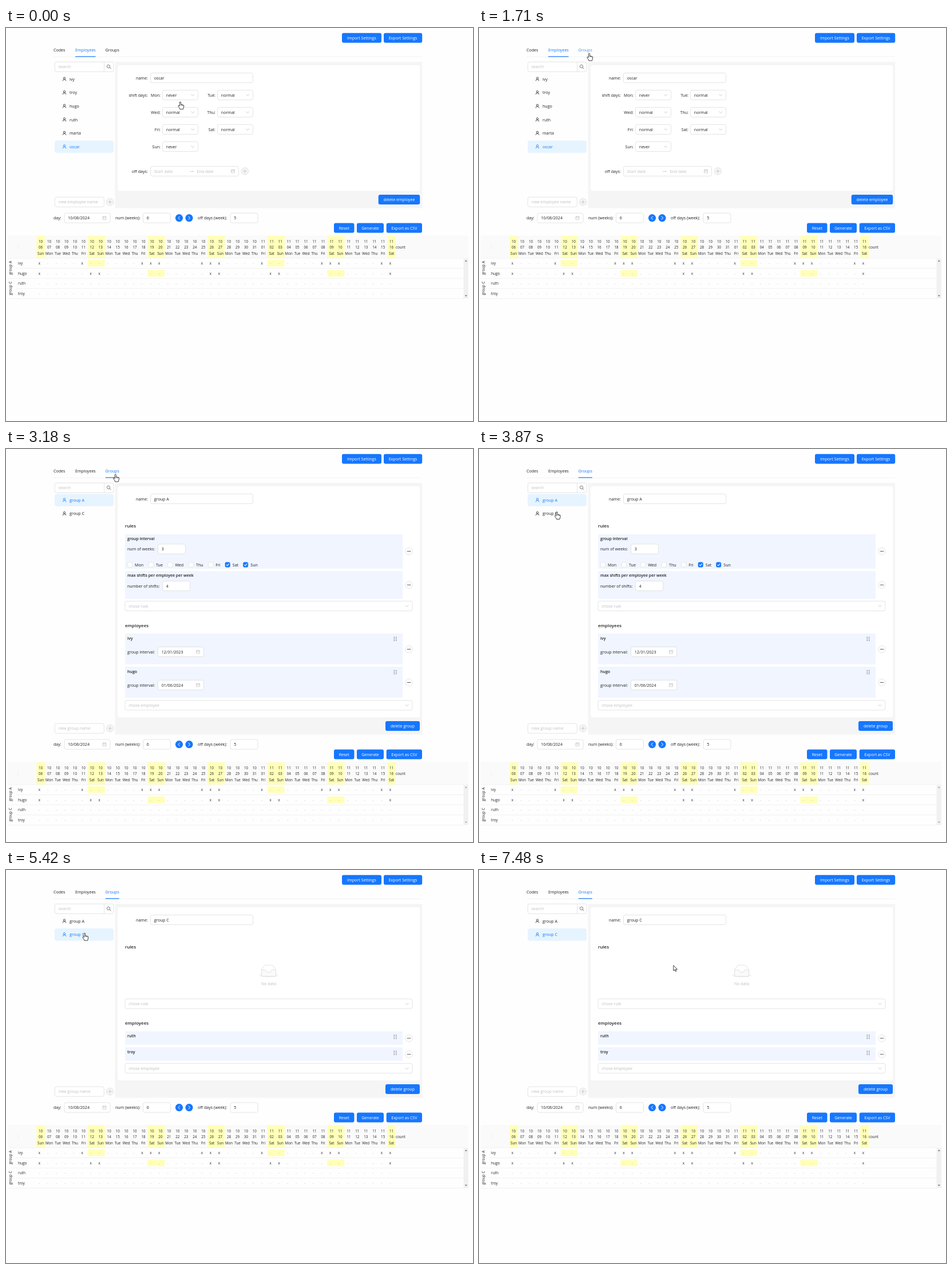
An HTML page that plays this animation: 816 by 686 pixels, repeating every 8 s.

```html
<!DOCTYPE html>
<html lang="en">
<head>
<meta charset="utf-8">
<title>Shift planner</title>
<style>
  html, body { margin: 0; width: 100%; height: 100%; overflow: hidden; background: #fefefe; }
  svg { display: block; width: 100vw; height: 100vh; }
  text { font-family: "Open Sans", "Noto Sans", sans-serif; font-size: 7.1px; white-space: pre; }
</style>
</head>
<body>
<svg id="stage" viewBox="0 0 816 686"></svg>
<script>
const LOOP = 8000;
const BLUE = '#1677ff', HOVER = '#4096ff', INK = '#222', PALE = '#bfbfbf', LINE = '#d9d9d9', YELLOW = '#ffffb8';
const days = ['Sun', 'Mon', 'Tue', 'Wed', 'Thu', 'Fri', 'Sat'];
const people = ['ivy', 'troy', 'hugo', 'ruth', 'marta', 'oscar'];
const [ivy, troy, hugo, ruth, , oscar] = people;

// Drawing helpers; y is the vertical centre of a line of text
const text = (x, y, s, fill = INK, more = '') =>
  `<text x="${x}" y="${y + 2.5}" fill="${fill}" ${more}>${s}</text>`;
const mid = (x, y, s, fill, more = '') => text(x, y, s, fill, 'text-anchor="middle" ' + more);
const end = (x, y, s) => text(x, y, s, INK, 'text-anchor="end"');
const bold = (x, y, s, size = 7) => text(x, y, s, INK, `style="font-weight:600;font-size:${size}px"`);
const rect = (x, y, w, h, fill, more = '') =>
  `<rect x="${x}" y="${y}" width="${w}" height="${h}" fill="${fill}" ${more}/>`;
const line = (d, stroke, w = .7, more = '') =>
  `<path d="${d}" fill="none" stroke="${stroke}" stroke-width="${w}" ${more}/>`;
const group = (id, body, more = '') => `<g id="${id}" ${more}>${body}</g>`;

const box = (x, y, w, s = '', fill = INK, more = '') =>
  rect(x, y - 8.5, w, 17, '#fff', `rx="3" stroke="${LINE}" stroke-width=".7" ${more}`) + text(x + 6.3, y, s, fill);
const button = (x, y, w, s) => rect(x, y - 8.5, w, 17, BLUE, 'rx="3"') + mid(x + w / 2, y, s, '#fff');
const chevron = (x, y) => line(`M${x - 2.8} ${y - 1.4}l2.8 2.9 2.8-2.9`, PALE, .8);
const select = (x, y, w, s, fill) => box(x, y, w, s, fill) + chevron(x + w - 9.3, y);
const calendar = (x, y) => line(`M${x - 3} ${y - 2.4}h6v5.2h-6zM${x - 3} ${y - .4}h6M${x - 1.5} ${y - 3.4}v1.8M${x + 1.5} ${y - 3.4}v1.8`, PALE);
const dateBox = (x, y, s) => box(x, y, 80, s) + calendar(x + 70, y);
const ring = (x, y, plus) =>
  `<circle cx="${x}" cy="${y}" r="6.2" fill="${plus ? '#f5f5f5' : '#fff'}" stroke="${LINE}" stroke-width=".7"/>` +
  line(`M${x - 3.3} ${y}h6.6` + (plus ? `M${x} ${y - 3.3}v6.6` : ''), plus ? PALE : '#333', .8);
const grip = (x, y) => [-1.7, 1.7].map(dx => [-2.9, 0, 2.9].map(dy =>
  rect(x + dx - .6, y + dy - .6, 1.2, 1.2, '#444')).join('')).join('');
const card = (y, h) => rect(208, y, 485, h, '#f0f5ff');

const row = (id, i, s, on) => {
  const y = 89.2 + i * 23.6;
  return rect(85, y - 10.8, 103, 21.6, '#e6f4ff', `rx="4" id="${id}Bg" opacity="${on ? 1 : 0}"`) +
    group(id, `<circle cx="102" cy="${y - 1.6}" r="1.7" fill="none" stroke="currentColor" stroke-width=".8"/>` +
      line(`M99.2 ${y + 3.2}q.2-2.9 2.8-2.9t2.8 2.9`, 'currentColor', .8) +
      text(111, y, s, 'currentColor'), `color="${on ? BLUE : INK}"`);
};

const nameField = (s, id) => end(247.8, 87, 'name:') + box(252.5, 87, 179, s, INK, id ? `id="${id}"` : '');

function employeePanel() {
  let out = nameField(oscar, 'nameBox') + end(247.8, 117, 'shift days:');
  [1, 2, 3, 4, 5, 6, 0].forEach((d, i) => {
    const x = i % 2 ? 369.5 : 273.5, y = 117 + (i >> 1) * 30;
    out += end(x - 3.5, y, days[d] + ':') + select(x, y, 62, d < 2 ? 'never' : 'normal');
  });
  return out + end(247.8, 250, 'off days:') + box(252.5, 250, 154, 'Start date', PALE) +
    line('M321 250.5h6.5l-2-1.8', PALE) + text(333.5, 250, 'End date', PALE) +
    calendar(396.5, 250) + ring(417.5, 250, true);
}

function checkboxes(y) {
  const xs = [212.3, 249.2, 282.6, 319.2, 353.5, 383, 414.5];
  return xs.map((x, i) => {
    const on = i > 4;
    return rect(x, y - 4.2, 8.4, 8.4, on ? BLUE : '#fff', `rx="2" stroke="${on ? BLUE : LINE}" stroke-width=".6"`) +
      (on ? line(`M${x + 2} ${y}l1.8 1.8 2.9-3.6`, '#fff', 1.1) : '') +
      text(x + 12.8, y, days[(i + 1) % 7]);
  }).join('');
}

const memberCard = (y, s, date) => card(y, 54) + bold(212, y + 8, s) + text(212, y + 32, 'group interval:') +
  dateBox(265.5, y + 32, date) + grip(680, y + 9.5) + ring(704, y + 27.5);

const panelA = () => nameField('group A') + bold(208, 134, 'rules', 7.9) +
  card(149, 60) + bold(212, 156, 'group interval') + text(212, 174.5, 'num of weeks:') +
  box(265.5, 174.5, 48, '3') + checkboxes(202) + ring(704, 178.5) +
  card(213, 48.5) + bold(212, 220.3, 'max shifts per employee per week') +
  text(212, 239, 'number of shifts:') + box(273.5, 239, 48, '4') + ring(704, 237.3) +
  select(208, 274, 502, 'chose rule', PALE) + bold(208, 308, 'employees', 7.9) +
  memberCard(322, ivy, '12/31/2023') + memberCard(380, hugo, '01/06/2024') +
  select(208, 447.3, 502, 'chose employee', PALE);

const smallCard = (y, s) => card(y, 23.5) + bold(212, y + 8, s) + grip(680, y + 9.7) + ring(704, y + 12.2);

const panelC = () => nameField('group C') + bold(208, 134, 'rules', 7.9) +
  '<ellipse cx="459" cy="184" rx="17" ry="3.6" fill="#f5f5f5"/>' +
  '<path d="M446.5 174.5l5-7.5q.6-.9 1.6-.9h11.8q1 0 1.6.9l5 7.5v9.3q0 1.7-1.7 1.7h-21.6q-1.7 0-1.7-1.7z" fill="#fff" stroke="#d9d9d9" stroke-width=".7"/>' +
  '<path d="M446.5 174.5h6.7q1.2 0 1.2 1.2 0 2.4 2 2.4h5.2q2 0 2-2.4 0-1.2 1.2-1.2h6.7v9.3q0 1.7-1.7 1.7h-21.6q-1.7 0-1.7-1.7z" fill="#fafafa" stroke="#d9d9d9" stroke-width=".7"/>' +
  mid(459, 198, 'No data', PALE) + select(208, 233.5, 502, 'chose rule', PALE) +
  bold(208, 267.3, 'employees', 7.9) + smallCard(281.5, ruth) + smallCard(309.5, troy) +
  select(208, 346.2, 502, 'chose employee', PALE);

function table() {
  const step = 14.951, rowH = 17.65, small = 'style="font-size:6.2px"';
  const rows = [
    { name: ivy, x: [0, 5, 12, 13, 14, 19, 20, 21, 26, 33, 34, 35, 40, 41], free: [6, 27] },
    { name: hugo, x: [0, 6, 7, 20, 21, 27, 28, 41], free: [13, 34] },
    { name: ruth, x: [], free: [] },
    { name: troy, x: [], free: [] }
  ];
  let out = rect(3, 362.3, 805, 39.7, '#fafafa') + line('M21.5 377v10', '#f0f0f0');
  for (let i = 0; i < 42; i++) {
    const x = 60.6 + i * step, d = i % 7, oct = i < 26;
    if (d === 0 || d === 6) out += rect(x - step / 2, 362.8, step + .05, 39, YELLOW);
    const day = String(oct ? i + 6 : i - 25).padStart(2, '0');
    [oct ? 10 : 11, day, days[d]].forEach((s, k) => {
      out += mid(x, 372 + k * 10.9, s, INK, 'style="font-size:6.2px;font-weight:500"');
    });
  }
  out += text(681, 382, 'count', INK, 'style="font-size:6.3px;font-weight:500"') + line('M3 402h797', '#f0f0f0');
  rows.forEach((r, k) => {
    const y = 410.6 + k * rowH;
    r.free.forEach(c => out += rect(53.1 + c * step - .1, y - 5.8, step * 2, 11.6, YELLOW));
    out += text(21, y, r.name, INK, 'style="font-size:6.5px"');
    for (let i = 0; i < 42; i++) {
      const on = r.x.includes(i);
      out += mid(58.4 + i * step, y, on ? 'x' : '-', on ? INK : '#b5b5b5', small);
    }
    out += line(`M${k % 2 ? 3 : 18} ${y + 8.8}H800`, '#ececec');
  });
  ['A', 'C'].forEach((s, k) => {
    out += `<text transform="translate(10.4 ${418.7 + k * 35.6}) rotate(-90)" text-anchor="middle" fill="${INK}" style="font-size:6.6px;font-weight:500">group ${s}</text>`;
  });
  return out + rect(799.5, 402, 8.5, 70.3, '#f1f1f1') +
    '<path id="arrows" d="M801.8 407.6h4l-2-2.4zM801.8 466.4h4l-2 2.4z"/>';
}

const lower = () => box(85.3, 303.7, 86) + ring(181.6, 303.7, true) +
  group('empFoot', text(91.8, 303.7, 'new employee name', PALE) + button(650.7, 299.5, 72.5, 'delete employee')) +
  group('grpFoot', text(91.8, 303.7, 'new group name', PALE) + button(663, 299.5, 60, 'delete group')) +
  text(83, 331.6, 'day:') + dateBox(102, 331.6, '10/08/2024') +
  text(191, 331.6, 'num (weeks):') + box(239.5, 331.6, 48, '6') +
  [302.5, 320].map((x, i) => `<circle cx="${x}" cy="331.6" r="6.6" fill="${BLUE}"/>` +
    line(i ? `M${x - 1.3} 328.6l2.8 3-2.8 3` : `M${x + 1.3} 328.6l-2.8 3 2.8 3`, '#fff', 1)).join('') +
  text(335, 331.6, 'off days (week):') + box(392, 331.6, 48, '5') +
  button(573, 349, 35.5, 'Reset') + button(613, 349, 47, 'Generate') + button(664.7, 349, 62.3, 'Export as CSV') +
  table();

const stage = document.getElementById('stage');
stage.innerHTML = button(587, 17.2, 69, 'Import Settings') + button(660, 17.2, 67.2, 'Export Settings') +
  line('M83 50.3H727', '#f0f0f0') + text(83, 38.5, 'Codes') +
  text(121, 38.5, 'Employees', BLUE, 'id="tabE"') + text(173.5, 38.5, 'Groups', INK, 'id="tabG"') +
  rect(121, 49.3, 35.5, 1.2, BLUE, 'id="bar"') +
  rect(190.6, 59.2, 536.6, 255.3, '#f5f5f5', 'id="outer"') + rect(195, 65, 528.2, 219.3, '#fff', 'rx="4" id="inner"') +
  box(85.3, 67.7, 102.7, 'search', PALE) + line('M171.5 59.5v16.6', LINE) +
  '<circle cx="179" cy="67" r="2.7" fill="none" stroke="#666" stroke-width=".8"/>' + line('M181 69l2.4 2.4', '#666', .9) +
  group('emp', people.map((s, i) => row('p' + i, i, s, i === 5)).join('') + employeePanel()) +
  group('grp', row('rowA', 0, 'group A', true) + row('rowC', 1, 'group C', false)) +
  group('panA', panelA()) + group('panC', panelC()) + group('low', lower()) +
  group('cursor',
    group('hand', '<path d="M-1.1 7.2V1a1.1 1.1 0 0 1 2.2 0V4.4l3.9.9q1.4.4 1.3 1.8L5.8 9.8 5 12.8H-.6L-1.2 10.8-3.6 7.6Q-3.8 6-2.3 6.2Z"/>' +
      line('M1.1 4.6v2M2.9 5v1.8M4.6 5.4v1.6', '#111', .6)) +
    '<path id="arrow" d="M0 0V9.4L2.2 7.4 3.6 10.6 5 10 3.6 6.9H6.6Z"/>',
    'fill="#fff" stroke="#111" stroke-width=".8" stroke-linejoin="round"');

const $ = {};
stage.querySelectorAll('[id]').forEach(e => $[e.id] = e);

const clamp = v => Math.min(1, Math.max(0, v));
const ease = v => v < .5 ? 4 * v ** 3 : 1 - (2 - 2 * v) ** 3 / 2;
const ramp = (t, a, b) => ease(clamp((t - a) / (b - a)));
const lerp = (a, b, p) => a + (b - a) * p;
const show = (id, on) => $[id].setAttribute('display', on ? 'inline' : 'none');
const set = (id, key, v) => $[id].setAttribute(key, v);
const rgb = c => (c.length < 5 ? [1, 2, 3].map(i => c[i] + c[i]) : [1, 3, 5].map(i => c.slice(i, i + 2))).map(h => parseInt(h, 16));
const mix = (a, b, p) => {
  const u = rgb(a), v = rgb(b);
  return `rgb(${u.map((c, i) => Math.round(lerp(c, v[i], p)))})`;
};

// Pointer moves: start, end, steps, way points
const moves = [
  [70, 430, 6, [[304.5, 129], [290, 108], [262, 86], [225, 65], [195, 57.3]]],
  [570, 570, 1, [[195, 57.3], [191.8, 56.6]]],
  [950, 950, 1, [[191.8, 56.6], [191.8, 50.4]]],
  [1300, 1440, 3, [[191.8, 50.4], [192.5, 44.3]]],
  [3180, 3180, 1, [[192.5, 44.3], [191.3, 44.3]]],
  [3310, 3940, 10, [[191.3, 44.3], [164, 70], [120, 90], [122, 105], [137.5, 110.3]]],
  [7220, 7480, 5, [[137.5, 110.3], [339.8, 166.5]]]
];

function pointer(t) {
  let at = moves[0][3][0];
  for (const [a, b, n, pts] of moves) {
    if (t < a) break;
    const k = t >= b ? n : Math.floor((t - a) / (b - a) * (n - 1)) + 1;
    const s = (1 - Math.cos(Math.PI * k / n)) / 2 * (pts.length - 1);
    const i = Math.min(pts.length - 2, Math.floor(s));
    at = [0, 1].map(j => lerp(pts[i][j], pts[i + 1][j], s - i));
  }
  return at;
}

const inside = ([x, y], l, t, r, b) => x >= l && x <= r && y >= t && y <= b;
const OPEN_A = 1780, OPEN_C = 5150;

function draw(t) {
  const scene = t < OPEN_A ? 0 : t < OPEN_C ? 1 : 2;
  const dy = [0, 184, 83][scene];
  show('emp', scene === 0);
  show('empFoot', scene === 0);
  show('grp', scene > 0);
  show('grpFoot', scene > 0);
  show('panA', scene === 1);
  show('panC', scene === 2);
  set('low', 'transform', `translate(0 ${dy})`);
  set('outer', 'height', 255.3 + dy);
  set('inner', 'height', 219.3 + dy);
  set('arrows', 'fill', scene === 1 ? '#a0a0a0' : '#666');

  const slide = ramp(t, OPEN_A, 2050), hover = ramp(t, 1370, 1640);
  set('bar', 'x', lerp(121, 173.8, slide));
  set('bar', 'width', lerp(35.5, 24, slide));
  set('tabE', 'fill', mix(BLUE, INK, slide));
  set('tabG', 'fill', slide > 0 ? mix(HOVER, BLUE, slide) : mix(INK, HOVER, hover));

  const pick = ramp(t, OPEN_C, 5420);
  set('rowABg', 'opacity', 1 - pick);
  set('rowCBg', 'opacity', ramp(t, 4870, 5080));
  set('rowA', 'color', mix(BLUE, INK, pick));
  set('rowC', 'color', mix(INK, BLUE, pick));

  const p = pointer(t);
  const hand = inside(p, 173, 30, 199, 49) || inside(p, 85, 78, 188, 124) || (scene === 0 && inside(p, 273, 108, 335, 131));
  set('nameBox', 'stroke', inside(p, 252, 78, 432, 96) ? HOVER : LINE);
  set('cursor', 'transform', `translate(${p[0]} ${p[1]})`);
  show('hand', hand);
  show('arrow', !hand);
}

const start = performance.now();
function tick() {
  draw((performance.now() - start) % LOOP);
  requestAnimationFrame(tick);
}
tick();
</script>
</body>
</html>
```
